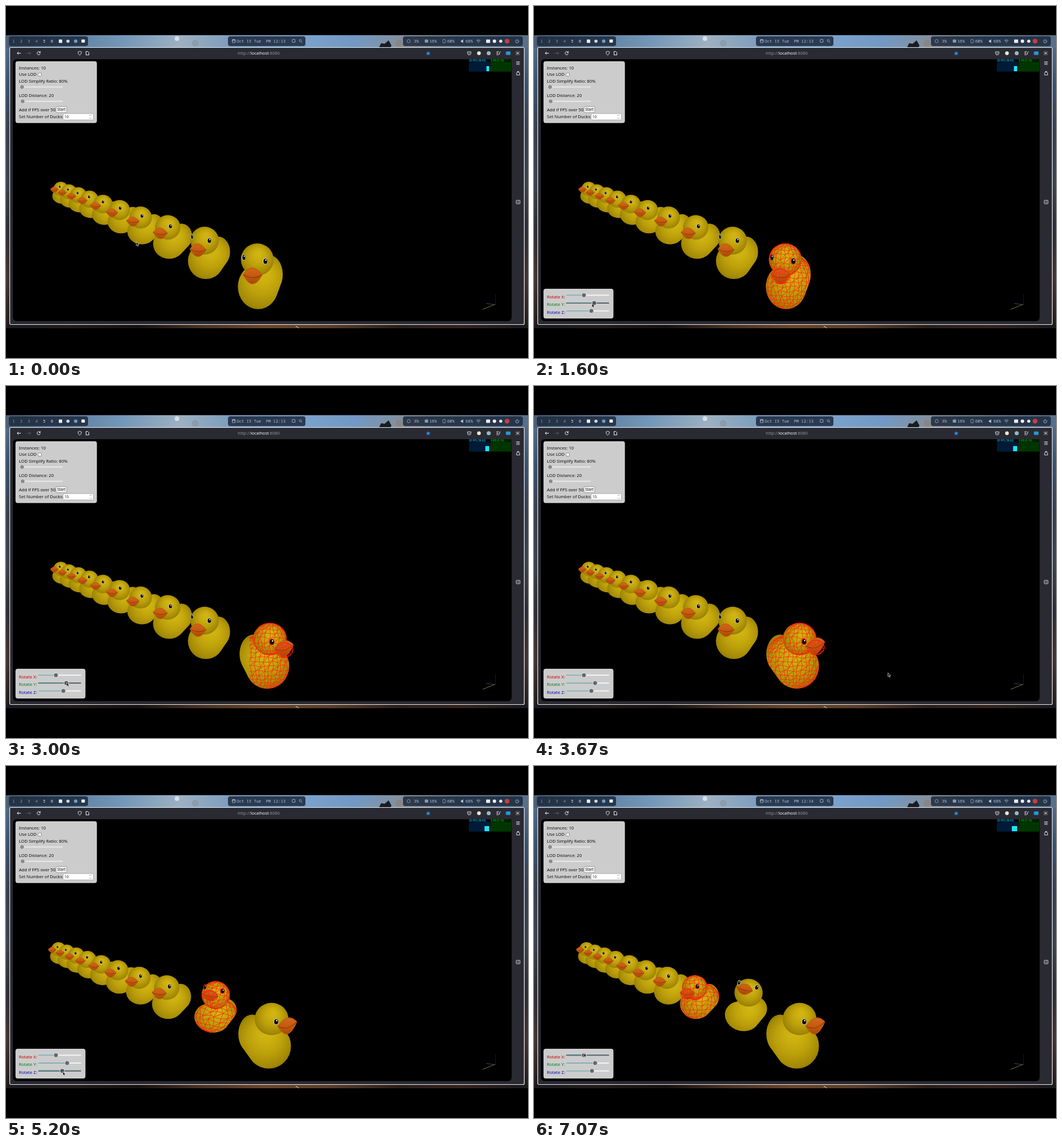
An HTML page with a canvas that plays this animation: 910x615 px, repeating every 7140 ms.

```html
<!DOCTYPE html>
<html lang="en">
<head>
<meta charset="utf-8">
<title>Duck instances</title>
<style>
  html, body { margin: 0; width: 100%; height: 100%; overflow: hidden; background: #000; }
  canvas { display: block; }
</style>
</head>
<body>
<canvas id="stage" width="910" height="615"></canvas>
<script>
const LOOP = 7140, TAU = Math.PI * 2, DEG = Math.PI / 180;
const SANS = '"Noto Sans", sans-serif', MONO = '"Noto Sans Mono", monospace';
const { sin, cos, abs, sqrt } = Math;
let g = document.getElementById('stage').getContext('2d');

// ---------- helpers ----------
const mix = (a, b, k) => a + (b - a) * k;
const mixAll = (a, b, k) => a.map((v, i) => mix(v, b[i], k));
const noise = n => { const s = sin(n * 127.1) * 43758.5; return s - Math.floor(s); };

// Eased values from a few [time, ...values] keys.
function track(t, ...keys) {
  const next = keys.findIndex(k => k[0] > t);
  if (next === 0) return keys[0].slice(1);
  if (next < 0) return keys[keys.length - 1].slice(1);
  const a = keys[next - 1], b = keys[next];
  const k = (t - a[0]) / (b[0] - a[0]);
  return mixAll(a, b, k * k * (3 - 2 * k)).slice(1);
}
function paint(p, fill, stroke, line = 1) {
  if (fill) { g.fillStyle = fill; g.fill(p); }
  if (stroke) { g.strokeStyle = stroke; g.lineWidth = line; g.stroke(p); }
}
function rect(x, y, w, h, fill, r = 0, stroke, line) {
  const p = new Path2D();
  p.roundRect(x, y, w, h, r);
  paint(p, fill, stroke, line);
}
function ellipse(x, y, rx, ry) {
  const p = new Path2D();
  p.ellipse(x, y, rx, ry, 0, 0, TAU);
  return p;
}
const oval = (x, y, rx, ry, ...style) => paint(ellipse(x, y, rx, ry), ...style);
const path = (d, stroke, line, fill) => paint(new Path2D(d), fill, stroke, line);
function text(s, x, y, fill = '#111', size = 7.6, family = SANS) {
  g.font = `${size}px ${family}`;
  g.fillStyle = fill;
  g.fillText(s, x, y);
  return x + g.measureText(s).width;
}
function ramp(x0, y0, x1, y1, ...colors) {
  const grad = g.createLinearGradient(x0, y0, x1, y1);
  colors.forEach((c, i) => grad.addColorStop(i / (colors.length - 1), c));
  return grad;
}

// ---------- desktop and browser ----------
function wallpaper() {
  rect(0, 51, 910, 512, ramp(0, 51, 0, 563, '#56728f', '#3a516c', '#363f4e', '#3c424c', '#2d2d33', '#44332e', '#201a1a'));
  rect(0, 51, 910, 22, ramp(0, 0, 910, 0, '#4a6078', '#5d7f9f', '#7397b8', '#9db1c2', '#7899bd', '#7ca3cd', '#7299c4', '#868d95', '#65809b', '#56708a'));
  oval(298, 57, 4, 4, '#d5e0e9');
  oval(330, 65, 6, 6, '#8b9dab');
  oval(685, 65, 6, 6, '#8a8580');
  path('M650 73L654 65L660 66L667 60L672 69L670 73Z', null, 0, '#191c23');
  rect(0, 557, 910, 6, ramp(0, 0, 910, 0, '#1b1b20', '#241b1a', '#15110f', '#4a3222', '#6a4529', '#5a3c27', '#2a1f1a', '#33241d', '#19191e'));
  path('M505 560Q509 560 510 563', '#ddd');
}
function topBar() {
  const ink = '#aec6dc', dim = '#7f9ab4', y = 64;
  const label = (s, x, color = ink) => text(s, x, y, color, 7.15, MONO);
  for (const [x, w] of [[5, 138], [387, 135], [692, 209]]) rect(x, 53, w, 17, 'rgba(31,43,61,.86)', 4);
  for (let i = 1; i <= 6; i++) label(i, i * 13.4 - 2.4, i > 4 ? '#e6eef5' : dim);
  rect(92, 58.5, 6, 6, '#e8eef4', 1);
  oval(108, 61.5, 2.8, 2.8, '#cfdae4');
  oval(121.5, 61.5, 3, 3, '#6fa0c8');
  rect(131.5, 58.5, 6, 5.5, '#f2f5f8', 1);

  rect(394.5, 58.5, 5, 5.5, null, .5, ink, .9);
  path('M394 60H400', ink);
  label('Oct 15 Tue', 402);
  rect(499, 58.5, 5, 5, null, .5, ink, .8);
  path('M514.3 62L516 64M514.8 60.5A1.8 1.8 0 1 1 514.8 60.4', ink, .8);

  oval(702, 61.5, 2.8, 2.8, null, dim);
  label('3%', 711);
  rect(730, 58.5, 6, 5.5, dim, 1);
  label('16%', 738);
  rect(761.5, 58.5, 4.5, 6, null, 1, dim);
  label('60%', 769);
  path('M793 60H795L797 58V65L795 63H793Z', null, 0, ink);
  label('68%', 801);
  path('M820 60.5Q823.5 57.5 827 60.5M821.5 62.3Q823.5 60.7 825.5 62.3M823 64H824', ink, .9);
  rect(837, 58.5, 7, 6, '#e6ebf0', 1);
  oval(851.5, 61.5, 3, 3, '#f1f4f6');
  oval(862.5, 61.5, 2.8, 2.8, '#e0e5ea');
  oval(873.5, 61.5, 4, 4, '#c8403c');
  path('M889.5 59.5A2.8 2.8 0 1 0 893 59.5M891.2 58V61.5', ink, .9);
}
function browser() {
  const ink = '#eeeef2', grey = '#92929c';
  rect(6.5, 72.5, 897, 484, '#2a2a32', 2, '#e9edf2', 1.2);
  rect(12, 93, 869.5, 457.5, '#000', 6);
  path('M26 82.5H19.5M22 80L19.5 82.5L22 85', ink);
  path('M36.5 82.5H43M40.5 80L43 82.5L40.5 85', '#5c5c66');
  path('M59 80.5A2.8 2.8 0 1 0 59.7 83M59.8 79V81.5H57.3', ink);
  path('M125.5 80.3L128.5 79L131.5 80.3Q131.5 84.5 128.5 86Q125.5 84.5 125.5 80.3Z', ink, .9);
  path('M139.5 79.5H142.5L144.5 81.5V85.5H139.5Z', ink);
  let x = text('http://', 404, 85.3, grey, 7.5);
  x = text('localhost', x, 85.3, '#fbfbfe', 7.5);
  text(':8080', x, 85.3, grey, 7.5);
  path('M736 78.6L737.2 81.2L740 81.5L738 83.4L738.5 86.2L736 84.8L733.5 86.2L734 83.4L732 81.5L734.8 81.2Z', null, 0, '#2f86dd');
  path('M804.5 80H810.5V82.5A3 3 0 0 1 804.5 82.5ZM806 82L807.5 83.4L809 82', ink, .9);
  oval(824.5, 82.5, 3.2, 3.2, '#eceade');
  oval(841.5, 82.5, 3.5, 3.5, '#8fb9c9');
  path('M855 80H859M855 82.5H858M855 85H858M861.5 79.5L859 85.5', ink);
  rect(871.5, 79.5, 8, 6, '#2798d8', 1);
  rect(888, 78.5, 8, 8, '#43434d', 1.5);
  path('M890.2 80.7L893.8 84.3M893.8 80.7L890.2 84.3', ink);
  path('M889.5 97.5H895.5M889.5 99.8H895.5M889.5 102H895.5', ink, .9);
  path('M890 120.5V118Q890 115.5 892.7 115.5Q895.5 115.5 895.5 118V120.5ZM891 114.5H894.5', ink, .9);
  rect(889.5, 339.5, 6.5, 6, null, 1, ink, .9);
  path('M891 342.5H894.5', ink, .9);

  path('M853.5 503V521', '#16222b', .8);
  path('M853 521L831 530', '#9b7d3c', .9);
  path('M853 522L837 519.5', '#235a78', .9);
}
const panel = (x, y, w, h) => rect(x, y, w, h, '#cccccc', 3, '#e2e2e2', .8);
function slider(x, y, end, thumb, [left, right, knob]) {
  rect(x, y - 1, end - x, 2, right, 1);
  rect(x, y - 1, thumb - x, 2, left, 1);
  oval(thumb, y, 4, 4, knob, '#e8e8ea', .9);
}
function settings() {
  const plain = ['#e9e9e9', '#e9e9e9', '#8b8b8f'];
  panel(17, 97, 141, 107);
  text('Instances: 10', 22.5, 110.5);
  text('Use LOD', 22.5, 122);
  rect(56, 117, 5.5, 5.5, '#fff', 1, '#777', .8);
  text('LOD Simplify Ratio: 80%', 22.5, 133.7);
  slider(24, 141.5, 99, 28, plain);
  text('LOD Distance: 20', 22.5, 158.8);
  slider(24, 166.5, 99, 29, plain);
  text('Add if FPS over 50', 22.5, 183.8);
  rect(87, 175.5, 19, 11, '#ececee', 2, '#8e8e94', .8);
  text('Start', 89.5, 183.3, '#222', 6.3);
  text('Set Number of Ducks:', 22.5, 196);
  rect(99.5, 188, 53, 11, '#fff', 1.5, '#9a9a9f', .7);
  text('10', 102, 195.8, '#222', 6.3);
  path('M145.5 192L147.5 190L149.5 192M145.5 195L147.5 197L149.5 195', '#888', .7);
}

// ---------- ducks ----------
const NEAR = 4.668;

// The row recedes to a vanishing point; a camera nudge moves the far end most.
function rowPose(i, nudge) {
  const z = NEAR + i, near = NEAR / z, tilt = near ** 1.5;
  return {
    x: -82.1 + 2428 / z - nudge * 6 * (1 - near),
    y: 255.4 + 875.5 / z + nudge * (1 - near),
    r: 28.2 * near ** .77,
    yaw: -75 + 280 / z,
    tilt, drop: .85 + .83 * tilt, roll: 0
  };
}
const blend = (a, b, k) => Object.fromEntries(Object.keys(a).map(key => [key, mix(a[key], b[key] ?? a[key], k)]));

function skin([x, y, rx, ry]) {
  const grad = g.createRadialGradient(x + rx * .1, y - ry * .4, 0, x, y, Math.max(rx, ry) * 1.22);
  ['#d3b713', '#cbaf0f', '#bc9f0b', '#a48a06', '#7d6900'].forEach((c, i) => grad.addColorStop(i / 4, c));
  return grad;
}
// Breast and tail joined by a run of blended ovals.
function bodyPath(breast, tail) {
  const p = new Path2D();
  for (let i = 0; i <= 12; i++) p.addPath(ellipse(...mixAll(breast, tail, i / 12)));
  return p;
}
// Jittered triangles wrapped around an ellipsoid.
function mesh(shape, [x, y, rx, ry], yaw, scale, edge) {
  const n = Math.max(5, Math.round(ry * scale / 2.6)), step = Math.PI / n;
  const point = (i, j) => {
    const seed = i * 31 + j;
    const lat = (i + noise(seed) * .6) * step - Math.PI / 2;
    const lon = (j + noise(seed + 7) * .6) * step - Math.PI / 2 + (yaw * DEG) % step;
    return [x + rx * cos(lat) * sin(lon), y + ry * sin(lat)];
  };
  const wires = new Path2D();
  for (let i = 0; i <= n; i++) for (let j = 0; j <= n; j++) {
    wires.moveTo(...point(i, j + 1));
    wires.lineTo(...point(i, j));
    wires.lineTo(...point(i + 1, j));
    if ((i + j) % 2) wires.lineTo(...point(i, j + 1));
  }
  const side = new Path2D();
  side.rect(edge, -9, 18, 18);
  g.save();
  g.clip(shape);
  g.clip(side);
  paint(wires, null, '#ff1e0c', .75 / scale);
  g.restore();
}
function eye(azimuth, tilt, marked) {
  const facing = cos(azimuth);
  if (facing < .25) return;
  const x = .97 * sin(azimuth), y = -.45 + .64 * tilt * facing, w = .17 * sqrt(facing);
  oval(x, y, w, .2, marked ? '#f02016' : '#c9c3a4');
  oval(x + w * .1, y, w * .75, .16, '#090909');
  oval(x + w * .3, y - .07, w * .25, .045, '#fff');
}
function beak(cx, cy, dir, lift, h) {
  const w = .58, tip = `${cx + dir * w} ${cy - lift}`, base = `${cx - dir * w} ${cy - h * .15}`;
  g.lineJoin = 'round';
  path(`M${base}Q${cx} ${cy - h * 2} ${tip}Q${cx} ${cy + h * 2.1} ${base}Z`, '#bd560d', .04,
    ramp(0, cy - h, 0, cy + h, '#cf651a', '#c2590e', '#a34605'));
  path(`M${base}Q${cx} ${cy + h * .5} ${tip}`, '#8c3b05', .045);
}
// Drawn in head radii around the head centre.
function duck({ x, y, r, yaw, tilt, drop, roll }, selected, edge = -9) {
  const a = yaw * DEG, side = abs(sin(a)), lean = abs(tilt);
  const head = [0, 0, 1 + .05 * side, 1];
  const breast = [-.2 * sin(a), drop, 1.2 + .2 * side, 1 + .4 * lean];
  const tail = [-1.6 * sin(a - 12 * DEG), drop * .55, .85, .8 + .4 * lean];
  const body = bodyPath(breast, tail), skull = ellipse(...head);
  const middle = mixAll(breast, tail, .3), bulk = [middle[0], middle[1], breast[2] * 1.3, breast[3] * 1.25];
  g.save();
  g.translate(x, y);
  g.rotate(roll * DEG);
  g.scale(r, r);
  paint(body, skin(bulk));
  if (selected) mesh(body, bulk, yaw, r, edge);
  paint(skull, skin(head));
  if (selected) mesh(skull, head, yaw, r, edge);
  for (const s of [-45, 45]) eye(a + s * DEG, tilt, selected);
  const bill = [1.12 * sin(a), 1.08 * cos(a) * tilt, .58, .36 + .12 * lean];
  beak(bill[0], bill[1], Math.sign(sin(a)), .4 * side * tilt, bill[3]);
  if (selected) mesh(ellipse(...bill), bill, yaw, r * 1.6, edge);
  g.restore();
}

// ---------- motion ----------
const PICKS = [930, 4330, 6530];

function rotation(t) {
  const idle = ['#83b1b3', '#f1f3f3', '#65656e'], held = ['#527f82', '#52666b', '#4f5660'];
  const active = t > 6900 ? 'X' : t > 4900 && t < 6200 ? 'Z' : t > 1550 && t < 3300 ? 'Y' : '';
  const turnY = track(t, [1600, 105], [2400, 100], [3250, 106.5])[0];
  const turnZ = track(t, [4950, 100], [5200, 98], [6130, 101])[0];
  panel(17, 494.5, 121, 51);
  [['X', '#c00808', 87], ['Y', '#0b7a1a', turnY], ['Z', '#0808b4', turnZ]].forEach(([axis, color, value], i) => {
    text(`Rotate ${axis}:`, 22.5, 510.5 + i * 13.8, color);
    slider(56, 505.3 + i * 13.7, 131, value, axis === active ? held : idle);
  });
}
function stats(t) {
  const meter = (x, back, graph, ink, label) => {
    rect(x, 93, 36.5, 21.5, back);
    rect(x, 98, 36.5, 16.5, graph);
    text(label, x + .5, 96.6, ink, 4.4);
  };
  meter(807, '#000822', '#001a38', '#0ee', '60 FPS (38-60)');
  meter(844.5, '#001c00', '#003500', '#0d0', '0 MS (0-18)');
  const left = 837.6 - t / LOOP * 4.6;
  rect(left, 105, 842.3 - left, 9, '#1be6ff');
}
function pointer(t) {
  const [x, y] = track(t, [300, 227, 412], [800, 440, 480], [1500, 101, 520], [3250, 106, 518], [3600, 624, 503],
    [4300, 350, 430], [4900, 99, 534], [6130, 100, 534], [6500, 285, 400], [7000, 87, 502]);
  g.save();
  g.translate(x, y);
  path('M0 0V6.6L1.6 5.2L2.7 7.6L3.9 7L2.8 4.8H4.8Z', '#f2f2f2', .7, '#0a0a0a');
  g.restore();
}
function ducks(t, picked) {
  const nudge = track(t, [3750, 0], [4100, 1])[0];
  const spin = track(t, [1650, 0], [2400, .53], [3300, 1])[0];
  const lean = track(t, [4950, 0], [5200, .7], [6150, 1])[0];
  for (let i = 9; i >= 2; i--) duck(rowPose(i, nudge), i === 2 && picked === 3);
  duck(blend(rowPose(1, 0), { x: 374, y: 396, yaw: -18, tilt: -.15, drop: 1.75, roll: 17 }, lean), picked === 2);
  duck(blend(rowPose(0, 0), { x: 463, y: 442, yaw: 61 }, spin), picked === 1, -2 + 2 * sin(Math.PI * spin));
}

const screen = g, backdrop = document.createElement('canvas');
backdrop.width = 910;
backdrop.height = 615;
g = backdrop.getContext('2d');
rect(0, 0, 910, 615, '#000');
wallpaper();
topBar();
browser();
settings();
g = screen;

function draw(now) {
  const t = Math.floor((now % LOOP) * .015 + 1e-6) / .015;
  const picked = PICKS.filter(p => t >= p).length;
  g.drawImage(backdrop, 0, 0);
  text(t < 6530 ? 'PM 12:13' : 'PM 12:14', 453, 64, '#aec6dc', 7.15, MONO);
  stats(t);
  ducks(t, picked);
  if (picked) rotation(t);
  pointer(t);
}
const start = performance.now();
function loop() {
  draw(performance.now() - start);
  requestAnimationFrame(loop);
}
loop();
</script>
</body>
</html>
```
